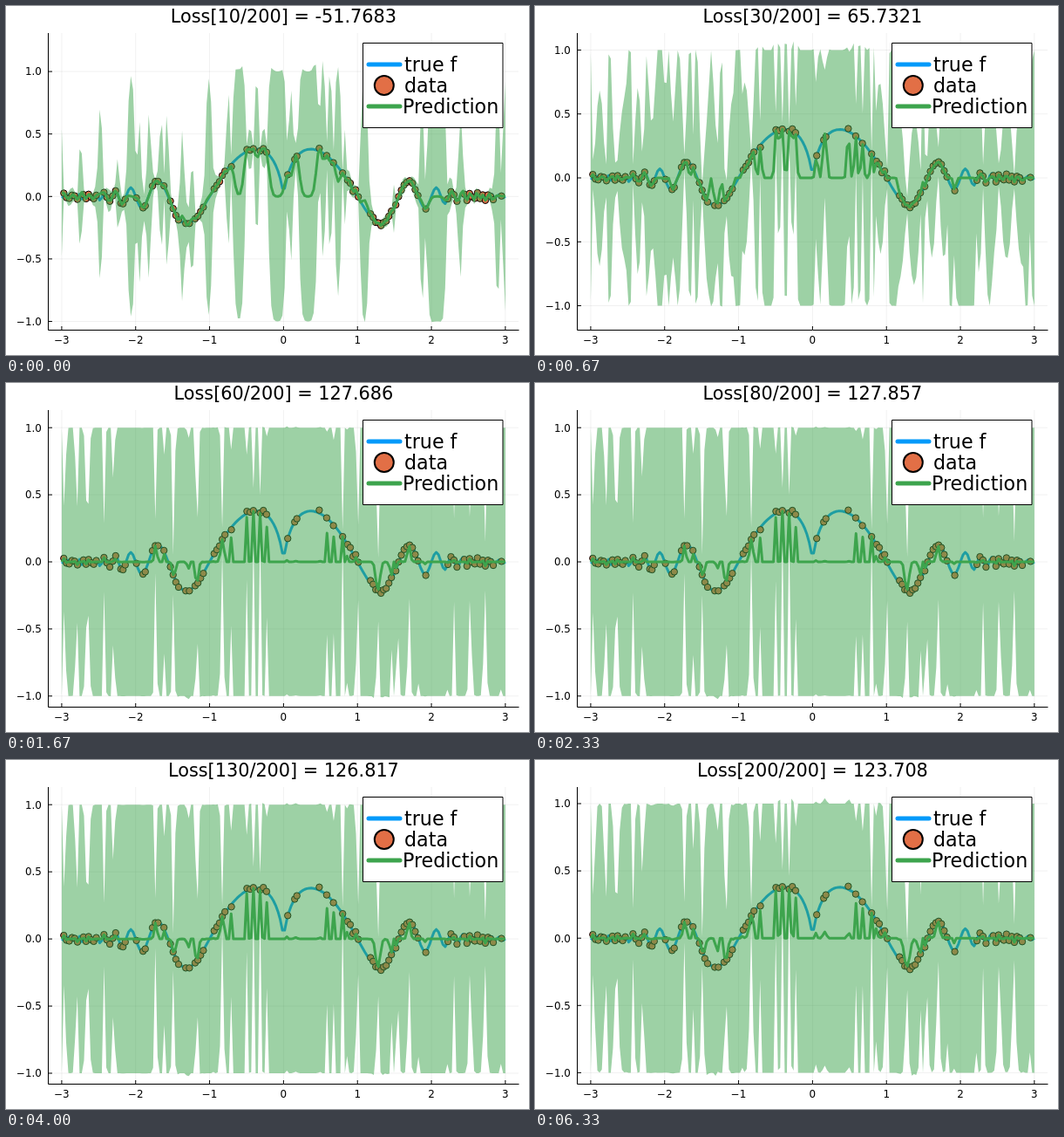
An HTML page with a canvas that plays this animation: 600 by 400 pixels, repeating every 6.66 s.

```html
<!DOCTYPE html>
<html lang="en">
<head>
<meta charset="utf-8">
<title>Gaussian process training</title>
<style>
  html, body { margin: 0; width: 100%; height: 100%; overflow: hidden; background: #fff; }
  canvas { display: block; width: 600px; height: 400px; }
</style>
</head>
<body>
<canvas id="plot" width="600" height="400"></canvas>
<script>
const ctx = document.getElementById('plot').getContext('2d');
const BLUE = '#009afa', ORANGE = '#e26f46', GREEN = '#3da44d';
const FONT = '"DejaVu Sans", sans-serif';
const LOOP = 6660, STEPS = 20, CX = 318.4, UNIT = 84.83, SPACING = 3;
const px = x => CX + UNIT * x;

// Training course: step, loss, kernel length scale, y of zero, pixels per unit
const course = [
  [1, -51.7683, 3.3, 218.3, 143.2],
  [3, 65.7321, 1.4, 197, 146.5],
  [4, 123.596, 0.55, 204.2, 154.2],
  [5, 127.6, 0.41, 205, 153.8],
  [8, 127.857, 0.4, 205, 153.8],
  [13, 126.817, 0.44, 205.1, 153.9],
  [16, 125.81, 0.47, 205.1, 153.9],
  [20, 123.708, 0.55, 204.2, 154.2]
];

function courseAt(step) {
  const k = Math.max(1, course.findIndex(row => row[0] >= step));
  const a = course[k - 1], b = course[k];
  const f = (step - a[0]) / (b[0] - a[0]);
  return a.map((v, i) => v * (1 - f) + b[i] * f);
}

// Training inputs: evenly filled spans with gaps between them
const spans = [[66.3, 82], [88.9, 103.6], [112.4, 125.8], [131.7, 136.8], [149.6], [157.2, 159.8],
  [168, 174.5], [181.2], [188.6, 198], [206.2, 210.4], [217, 226.4], [238.8, 251.2], [258.6],
  [276.4, 283.8], [291.6, 298.9], [323.2], [331.2, 333.7], [359.4], [367.9], [375.6], [386.2],
  [391.9, 404.2], [418.2, 442.2], [447.2, 472.6], [481.6], [507, 517.4], [525.8, 559], [568.4]];

const inputs = spans.flatMap(([from, to = from]) => {
  const n = Math.round((to - from) / SPACING);
  return Array.from({ length: n + 1 }, (_, i) => from + (to - from) * i / (n || 1));
});

// sinc(|x|^|x|)
function truth(p) {
  const a = Math.abs(p - CX) / UNIT, u = Math.PI * a ** a;
  return Math.sin(u) / u;
}

let seed = 7;
function random() {
  seed = (seed * 16807) % 2147483647;
  return seed / 2147483647;
}
const gauss = () => Math.sqrt(-2 * Math.log(random())) * Math.cos(2 * Math.PI * random());

const targets = inputs.map(p => truth(p) + 0.01 * gauss());
const grid = Array.from({ length: 200 }, (_, i) => px(-3 + 6 * i / 199));
const curve = grid.map(truth);

// Solves L v = b for a lower triangular L
function forward(L, b) {
  const v = [];
  for (let i = 0; i < b.length; i++) {
    let s = b[i];
    for (let j = 0; j < i; j++) s -= L[i][j] * v[j];
    v.push(s / L[i][i]);
  }
  return v;
}

// Posterior mean and deviation on the grid for one length scale
function posterior(scale) {
  const kernel = (a, b) => Math.exp(-0.5 * ((a - b) / scale) ** 2);
  const L = [];
  inputs.forEach((a, i) => {
    const row = forward(L, inputs.slice(0, i).map(b => kernel(a, b)));
    row.push(Math.sqrt(1.0001 - row.reduce((s, v) => s + v * v, 0)));
    L.push(row);
  });
  const w = forward(L, targets);
  return grid.map(p => {
    const v = forward(L, inputs.map(a => kernel(p, a)));
    let mean = 0, variance = 1;
    v.forEach((q, i) => { mean += q * w[i]; variance -= q * q; });
    return { mean, dev: Math.sqrt(Math.max(variance, 0)) };
  });
}

const steps = Array.from({ length: STEPS }, (_, i) => {
  const [step, loss, scale, zero, unit] = courseAt(i + 1);
  const title = `Loss[${Math.round(step * 10)}/200] = ${Number(loss.toPrecision(6))}`;
  return { title, zero, unit, fit: posterior(scale) };
});

function line(points, color, width) {
  ctx.beginPath();
  points.forEach(([x, y]) => ctx.lineTo(x, y));
  ctx.strokeStyle = color;
  ctx.lineWidth = width;
  ctx.stroke();
}

function dot(x, y, r, width) {
  ctx.beginPath();
  ctx.arc(x, y, r, 0, 2 * Math.PI);
  ctx.fillStyle = ORANGE;
  ctx.fill();
  ctx.strokeStyle = '#000';
  ctx.lineWidth = width;
  ctx.stroke();
}

function text(str, x, y, size, align) {
  ctx.font = `${size}px ${FONT}`;
  ctx.textAlign = align;
  ctx.fillStyle = '#000';
  ctx.fillText(str, x, y);
}

const label = (v, digits) => v.toFixed(digits).replace('-', '−');

function axes(py) {
  const faint = 'rgba(0,0,0,0.06)';
  for (let v = -3; v <= 3; v++) {
    line([[px(v), 31], [px(v), 371]], faint, 1);
    line([[px(v), 371], [px(v), 367]], '#000', 1);
    text(label(v, 0), px(v), 387.3, 11.9, 'center');
  }
  for (let v = -1; v <= 1; v += 0.5) {
    line([[48.5, py(v)], [588, py(v)]], faint, 1);
    line([[48.5, py(v)], [53, py(v)]], '#000', 1);
    text(label(v, 1), 40.8, py(v) + 4.3, 11.9, 'right');
  }
  line([[48.5, 31], [48.5, 371.5], [588.5, 371.5]], '#000', 1);
}

function legend() {
  ctx.fillStyle = '#fff';
  ctx.fillRect(409.5, 42.5, 160.5, 97);
  ctx.strokeStyle = '#000';
  ctx.lineWidth = 1;
  ctx.strokeRect(409.5, 42.5, 160.5, 97);
  ctx.lineCap = 'round';
  line([[416, 67], [452, 67]], BLUE, 5);
  line([[416, 115], [452, 115]], GREEN, 5);
  ctx.lineCap = 'butt';
  dot(433.8, 91, 11, 2);
  ['true f', 'data', 'Prediction'].forEach((s, i) => text(s, i < 2 ? 457 : 455, 75.2 + 24 * i, 22.2, 'left'));
}

function draw({ title, zero, unit, fit }) {
  const py = v => zero - unit * v;
  ctx.fillStyle = '#fff';
  ctx.fillRect(0, 0, 600, 400);
  ctx.lineJoin = 'round';
  axes(py);
  text(title, CX, 18.5, 20.8, 'center');

  line(grid.map((x, i) => [x, py(curve[i])]), BLUE, 3);
  inputs.forEach((x, i) => dot(x, py(targets[i]), 3.7, 1));

  ctx.beginPath();
  fit.forEach((f, i) => ctx.lineTo(grid[i], py(f.mean + f.dev)));
  for (let i = fit.length - 1; i >= 0; i--) ctx.lineTo(grid[i], py(fit[i].mean - fit[i].dev));
  ctx.globalAlpha = 0.5;
  ctx.fillStyle = GREEN;
  ctx.fill();
  ctx.globalAlpha = 1;

  line(fit.map((f, i) => [grid[i], py(f.mean)]), GREEN, 3);
  legend();
}

let shown = -1;
const start = performance.now();
function tick() {
  const t = Math.max(0, performance.now() - start) % LOOP;
  let i = 0;
  while (i < STEPS - 1 && Math.round((i + 1) * 100 / 3) * 10 <= t) i++;
  if (i !== shown) draw(steps[shown = i]);
  requestAnimationFrame(tick);
}
tick();
</script>
</body>
</html>
```
